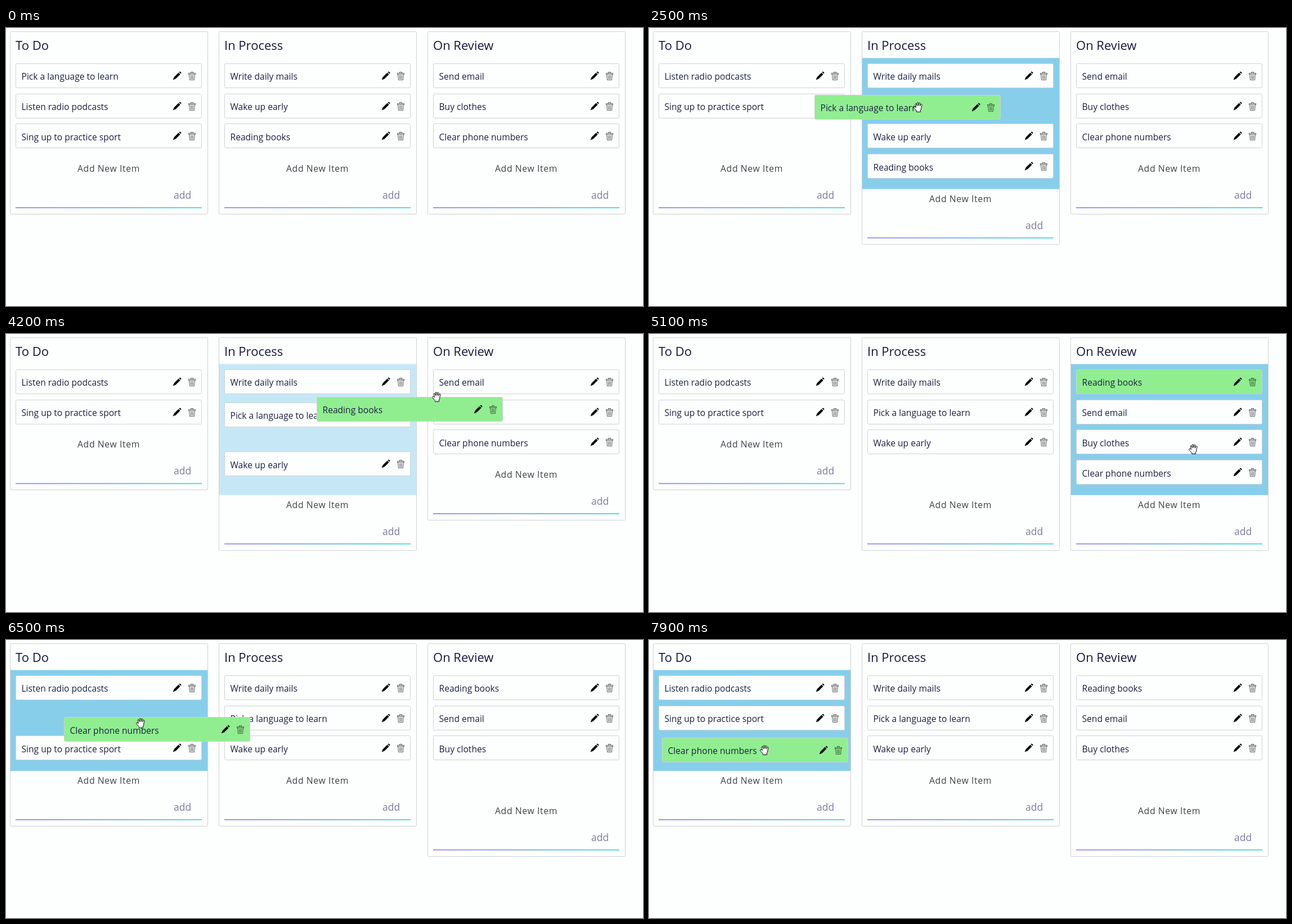
These frames come from a looping animation (1132 by 495 pixels, 8 s). An HTML page with a canvas:

```html
<!DOCTYPE html>
<html lang="en">
<head>
<meta charset="utf-8">
<title>Task board</title>
<style>
html, body { margin: 0; width: 100%; height: 100%; overflow: hidden; background: #fdfefe; }
canvas { display: block; }
</style>
</head>
<body>
<canvas id="stage" width="1132" height="495"></canvas>
<script>
const ctx = document.getElementById('stage').getContext('2d');
const LOOP = 8000, STEP = 100, SLIDE = 200, LANDING = 350, LAG = 50;
const PAPER = '#fdfefe', BORDER = '#cfd1d3', INK = '#1b2143';
const PITCH = 371, ROW = 53.7, CARD_W = 331, CARD_H = 44;
const GRIP = { x: 182, y: 22 };

const titles = ['To Do', 'In Process', 'On Review'];
const board = [
  ['Pick a language to learn', 'Listen radio podcasts', 'Sing up to practice sport'],
  ['Write daily mails', 'Wake up early', 'Reading books'],
  ['Send email', 'Buy clothes', 'Clear phone numbers']
];
const cards = board.flat();

// Each hover is [time, column, slot]; column -1 is outside every list.
const drags = [
  { card: 'Pick a language to learn', release: 3050, hovers: [[2150, 0, 0], [2270, 1, 1]] },
  { card: 'Reading books', release: 4900, hovers: [[4105, 1, 2], [4190, 1, 1], [4250, 2, 0]] },
  { card: 'Clear phone numbers', release: LOOP,
    hovers: [[6050, -1, 0], [6250, 0, 1], [6750, 0, 0], [7550, 0, 1], [7680, 0, 2]] }
];

// Each glide is [start, end, x, y]; the pointer rests in between.
const glides = [
  [0, 0, 232, 188], [300, 400, 250, 205], [500, 1100, 185, 107], [1500, 1800, 183, 89],
  [2100, 2470, 478, 141], [2500, 2650, 508, 139], [2800, 2850, 540, 139], [3000, 4000, 569, 248],
  [4100, 4167, 765, 112], [4200, 4600, 945, 87], [4900, 5100, 967, 205], [5200, 5600, 941, 250],
  [6005, 6100, 609, 237], [6100, 6600, 196, 138], [6700, 6950, 191, 84], [7500, 7850, 205, 196]
];

const clamp = k => Math.min(1, Math.max(0, k));
const mix = (a, b, k) => a + (b - a) * k;
const easeOut = k => 1 - (1 - clamp(k)) ** 2;
const smooth = k => clamp(k) ** 2 * (3 - 2 * clamp(k));

// Board states: a list keeps room for a card that left it until that card has landed.
const states = [{ time: -SLIDE, lists: board, rows: board.map(list => list.length), over: -1 }];
for (const drag of drags) {
  const { rows } = states.at(-1);
  for (const [time, over, slot] of drag.hovers) {
    const lists = states.at(-1).lists.map(list => list.filter(card => card !== drag.card));
    lists[over]?.splice(slot, 0, drag.card);
    states.push({ time, lists, over, rows: lists.map((list, i) => Math.max(list.length, rows[i])) });
  }
  const { lists } = states.at(-1);
  drag.grab = drag.hovers[0][0];
  drag.end = drag.release + LANDING;
  states.push({ time: drag.end, lists, over: -1, rows: lists.map(list => list.length) });
}

const stateAt = t => states.findLast(state => state.time <= t);
const dragAt = t => drags.find(drag => t >= drag.grab && t < drag.end);

// Every change of a state's value is spread over SLIDE.
function blend(t, value, ease) {
  return states.reduce((sum, state, i) => {
    const change = value(state) - (i ? value(states[i - 1]) : 0);
    return sum + change * ease((t - state.time) / SLIDE);
  }, 0);
}

function pointerAt(t) {
  let x = 0, y = 0;
  for (const [start, end, toX, toY] of glides) {
    if (t < start) break;
    const k = end > start ? smooth((t - start) / (end - start)) : 1;
    x = mix(x, toX, k);
    y = mix(y, toY, k);
  }
  return { x, y };
}

function place(card, t) {
  const column = stateAt(t).lists.findIndex(list => list.includes(card));
  const slotOf = ({ lists }) => Math.max(...lists.map(list => list.indexOf(card)));
  const x = 17 + PITCH * column, y = 63 + ROW * blend(t, slotOf, easeOut);
  const drag = dragAt(t);
  if (drag?.card !== card) return { x, y };
  const hand = pointerAt(Math.min(t - LAG, drag.release));
  const landed = easeOut((t - drag.release) / SLIDE);
  return { x: mix(hand.x - GRIP.x, x, landed), y: mix(hand.y - GRIP.y, y, landed) };
}

const PENCIL = new Path2D('M10.9 1.1 12.2 0Q14 .4 15 2.6L13.9 4.1ZM10 2 13 5 5 13 0 15 2 10Z');
const TRASH = new Path2D('M.5 2.5H12.5V4.5H.5ZM4.5 2.5V.5H8.5V2.5M1.5 4.5 2.5 14.5H10.5L11.5 4.5' +
  'M4.2 6 4.6 13M6.5 6V13M8.8 6 8.4 13');
const ARROW = new Path2D('M.5 .5V15.5L4 12.3 6.5 18 8.6 17 6.2 11.5H11Z');
const HAND = new Path2D('M4.6 9.5 3 4.6Q2.7 3.2 3.8 2.9 4.9 2.7 5.4 4L6.4 6.6 6.2 2Q6.2.6 7.4.6 8.6.6 8.7 2' +
  'L9 6.4 9.6 2.4Q9.8 1.1 11 1.3 12.1 1.5 12 2.8L11.7 6.8 13 4.4Q13.7 3.3 14.6 3.8 15.6 4.3 15 5.7' +
  'L13.8 9.5V12L12.3 15V17.4H5.6V15.6L1 10.6Q0 9.2 1 8.5 2 7.8 3.2 8.8Z');

function box(x, y, w, h, fill) {
  ctx.beginPath();
  ctx.roundRect(x + .5, y + .5, w - 1, h - 1, 2);
  ctx.fillStyle = fill;
  ctx.fill();
  ctx.strokeStyle = BORDER;
  ctx.lineWidth = 1;
  ctx.stroke();
}

function label(text, x, y, size, color, weight = 400, spacing = 0) {
  ctx.font = `${weight} ${size}px "Open Sans", "Noto Sans", sans-serif`;
  ctx.letterSpacing = spacing + 'px';
  ctx.fillStyle = color;
  ctx.fillText(text, x, Math.round(y));
}

function icon(path, x, y, fill, stroke) {
  ctx.save();
  ctx.translate(x, y);
  if (fill) { ctx.fillStyle = fill; ctx.fill(path); }
  if (stroke) { ctx.strokeStyle = stroke; ctx.lineWidth = 1; ctx.stroke(path); }
  ctx.restore();
}

function drawColumn(title, i, t) {
  const x = 7 + PITCH * i, end = 170 + ROW * stateAt(t).rows[i];
  box(x, 6, 352, Math.round(end) - 5, PAPER);
  ctx.globalAlpha = clamp(blend(t, state => +(state.over === i), smooth));
  ctx.fillStyle = '#87ceeb';
  ctx.fillRect(x + 1, 53.5, 350, end - 151.5);
  ctx.globalAlpha = 1;
  label(title, x + 10, 39, 22, '#17183f', 500);
  label('Add New Item', x + 120, end - 75, 15.8, '#3f4247', 400, .6);
  label('add', x + 291, end - 27, 17.5, '#7d7ca3');
  const line = ctx.createLinearGradient(x + 10, 0, x + 341, 0);
  ['#a98ff5', '#7fb5ea', '#52dfe3'].forEach((color, k) => line.addColorStop(k / 2, color));
  ctx.fillStyle = line;
  ctx.fillRect(x + 10, end - 12.1, CARD_W, 2);
}

function drawCard(card, t, fill) {
  const spot = place(card, t), x = Math.round(spot.x), y = Math.round(spot.y);
  box(x, y, CARD_W, CARD_H, fill);
  label(card, x + 10.5, spot.y + 29.4, 15.6, INK);
  icon(PENCIL, x + 279.6, y + 14.4, '#000');
  icon(TRASH, x + 307, y + 15, null, 'rgba(40,40,40,.72)');
}

function drawPointer(t) {
  const hand = pointerAt(t), x = Math.round(hand.x), y = Math.round(hand.y);
  const overCard = cards.some(card => {
    const spot = place(card, t);
    return x >= spot.x && x < spot.x + CARD_W && y >= spot.y && y < spot.y + CARD_H;
  });
  if (dragAt(t) || overCard) icon(HAND, x - 8, y - 9, '#fff', '#000');
  else icon(ARROW, x, y, '#fff', '#000');
}

function draw(now) {
  const t = Math.floor(now % LOOP / STEP) * STEP;
  const held = dragAt(t)?.card;
  ctx.fillStyle = PAPER;
  ctx.fillRect(0, 0, 1132, 495);
  titles.forEach((title, i) => drawColumn(title, i, t));
  cards.filter(card => card !== held).forEach(card => drawCard(card, t, PAPER));
  if (held) drawCard(held, t, '#90ee90');
  if (t >= 300) drawPointer(t);
}

const start = performance.now();
function tick() {
  draw(performance.now() - start);
  requestAnimationFrame(tick);
}
tick();
</script>
</body>
</html>
```
